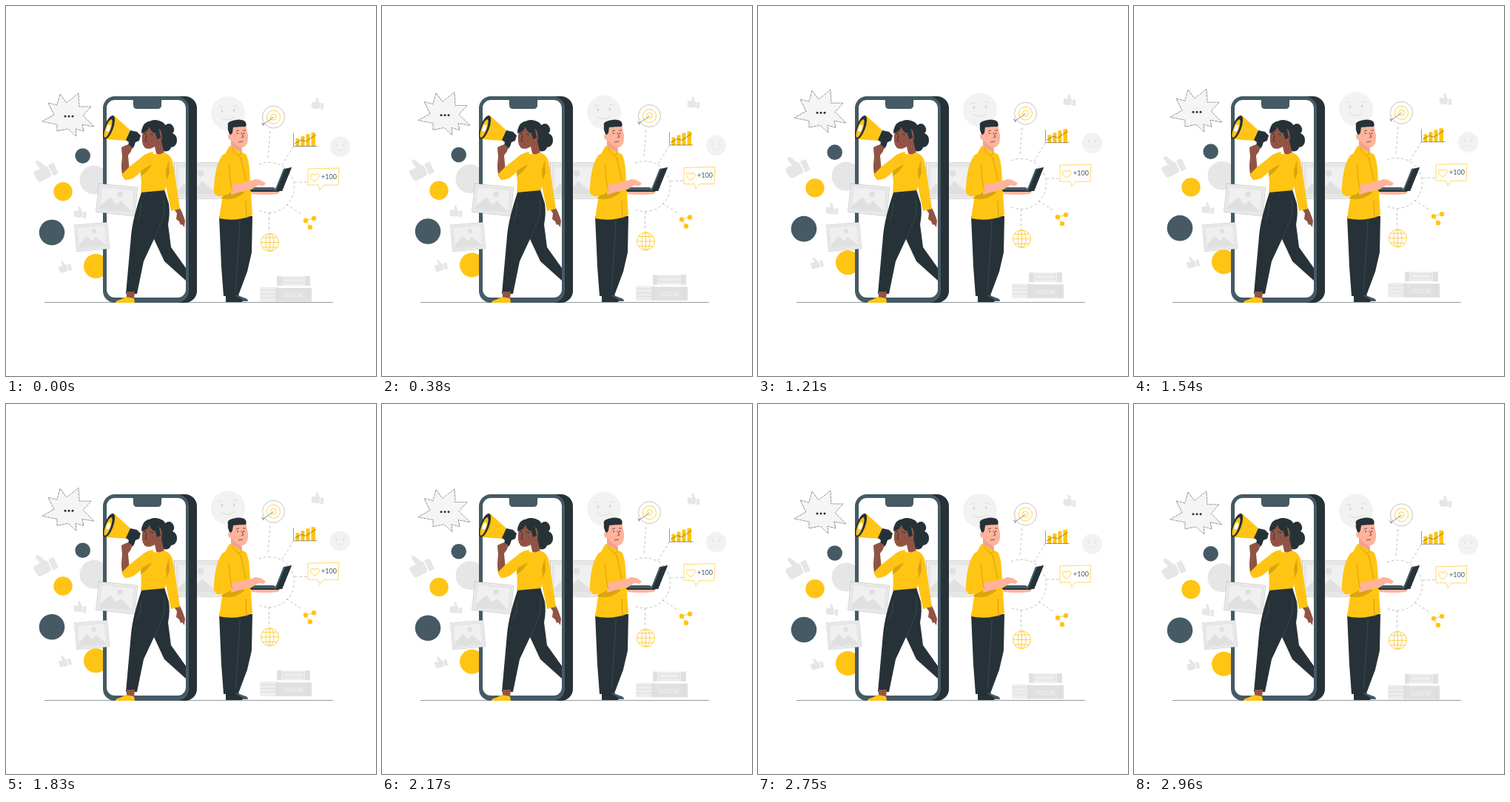
An HTML page that plays this animation: 500 px wide and 500 px high, repeating every 3 s.

```html
<!DOCTYPE html>
<html lang="en">
<head>
<meta charset="utf-8">
<title>Mobile marketing</title>
<style>
html, body { margin: 0; width: 100%; height: 100%; overflow: hidden; background: #fff; }
svg { display: block; width: 100vw; height: 100vh; }
.y { fill: #ffc414; }
.s { fill: #455a64; }
.d { fill: #263238; }
.brown { fill: #915444; }
.peach { fill: #ffb39c; }
.line { fill: none; stroke: #263238; stroke-width: .5; }
.gold { fill: none; stroke: #ffc414; stroke-width: .8; }
.dash { fill: none; stroke: #a6a6a6; stroke-width: .7; stroke-dasharray: 3.5 3; }
.frame { fill: #fff; stroke: #666; stroke-width: .5; stroke-dasharray: 1.5 .8; }
text { font-family: Lato, Inter, sans-serif; }
</style>
</head>
<body>
<svg viewBox="0 0 500 500">
<defs>
  <g id="thumb">
    <path d="M-15 0q0-3 3-3h8l-2-8q-.5-4 2.500-4 2 0 3 3l4 8 3 3v12q-3 2-6 2h-11q-3 0-3-2.500l-1-3z"/>
    <path d="M8-3h8v16h-8z"/>
  </g>
  <g id="smile">
    <circle r="23" fill="#f2f2f2"/>
    <path d="M-9 6q8 7 18-1M-13-8q3-3 6-1M7-10q3-2 6 1" fill="none" stroke="#dcdcdc" stroke-linecap="round"/>
    <g fill="#d6d6d6"><ellipse cx="-8" cy="-3" rx="1.300" ry="2"/><ellipse cx="8" cy="-4" rx="1.300" ry="2"/></g>
  </g>
  <g id="photo">
    <path class="frame" d="M-1-1h54v41h-54z"/>
    <path fill="#e6e6e6" d="M0 0h52v39h-52z"/>
    <path fill="#f0f0f0" d="M4 4h44v31h-44z"/>
    <path fill="#e0e0e0" d="M4 35v-5l13-13 9 9 6-6 16 14v1z"/>
    <circle cx="30" cy="11" r="4" fill="#e0e0e0"/>
  </g>
</defs>

<g class="float">
  <g fill="#e6e6e6">
    <use href="#thumb" transform="translate(51 221) rotate(-25)"/>
    <use href="#thumb" transform="translate(100 279) rotate(8) scale(.54)"/>
    <use href="#thumb" transform="translate(79 352) rotate(-15) scale(.55)"/>
    <use href="#thumb" transform="translate(421 132) rotate(8) scale(.54)"/>
  </g>

  <path fill="#f5f5f5" d="M58 133l12 2 4-15 9 13 15-14v18l14 1-9 10 14 13-14-1 3 9-12-4 1 9-11-9-14 4-1-10-17-4 13-8z"/>
  <path class="line" stroke-dasharray="4 .7" d="M57 131l12 3 4-15 9 12 16-13 1 18 16 0-11 12 15 15-16-3 2 9-11-3 1 10-11-10-15 3 0-9-20-4 16-9z"/>
  <g class="d"><circle cx="80" cy="149" r="1.500"/><circle cx="85" cy="149" r="1.500"/><circle cx="90" cy="149" r="1.500"/></g>

  <circle class="s" cx="103.700" cy="202.500" r="10.300"/>
  <circle cx="119" cy="235" r="19.500" fill="#e6e6e6"/>
  <circle class="y" cx="77" cy="250.700" r="12.700"/>
  <circle class="s" cx="62" cy="306" r="17.300"/>
  <circle class="y" cx="121.500" cy="351.500" r="16.500"/>

  <use href="#smile" transform="translate(300 145)"/>
  <use href="#smile" transform="translate(451.500 190) scale(.6)"/>

  <path class="dash" d="M342 214A34 34 0 1 1 342 276.500M354 205L357 167M373 215L388 190M390 238h18M379 268l21 14M355.500 279v27"/>

  <circle cx="361.500" cy="150" r="15" fill="#fff" stroke="#888" stroke-width=".5"/>
  <circle class="gold" cx="361.500" cy="150" r="9"/>
  <circle class="gold" cx="361.500" cy="150" r="4"/>
  <path class="line" d="M346 161L362 150M345 158l3 1v3"/>

  <path class="y" d="M391.500 179h5v10.500h-5zM398.500 176h5v13.500h-5zM405.500 173h5v16.500h-5zM412.500 171h5.500v18.500h-5.500z"/>
  <path class="line" d="M388.500 172v17.500h32M390 186l9-5 6 2 14-9"/>

  <path class="gold" stroke-dasharray="3 .7" d="M408 220l42-1-1 23h-20l-5 7-2-7h-14z"/>
  <path class="gold" d="M417 237c-8-5-6-10-3-10q2 0 3 2 1-2 3-2c4 0 5 5-3 10z"/>
  <text class="s" x="426" y="234" font-size="9">+100</text>

  <path class="gold" d="M416 287l-11 3 6 9"/>
  <g class="y"><circle cx="416" cy="287" r="3.200"/><circle cx="405" cy="290" r="3.200"/><circle cx="411" cy="299" r="3.200"/></g>

  <g class="gold">
    <circle cx="356.500" cy="319.500" r="12"/>
    <ellipse cx="356.500" cy="319.500" rx="5.500" ry="12"/>
    <path d="M356.500 307.500v24M344.500 319.500h24M347 313h19M347 326h19"/>
  </g>

  <path fill="#ededed" d="M343 380h26v19.500h-26zM366 365h45v13h-45z"/>
  <path fill="#e0e0e0" d="M364 381h49v18.500h-49zM366 365h6v13h-6zM404 365h7v13h-7z"/>
  <path stroke="#d6d6d6" stroke-width=".7" fill="none" d="M344 384h20M344 389h20M344 394h20M367 381v18M409 381v18M374 368h28v6h-28z"/>
  <text x="374" y="394" font-size="8" font-weight="700" fill="#f0f0f0">COLOR</text>
</g>

<path class="line" d="M52 400.500h390"/>

<!-- Phone: one photo sits between the screen and the rim -->
<rect x="135" y="126" width="110" height="270" rx="12" fill="#fff"/>
<use href="#photo" transform="translate(228.500 213) scale(1.150 1.180)"/>
<path class="d" d="M228 122h14a16 16 0 0 1 16 16v247a16 16 0 0 1-16 16h-14q15-1 15-16v-247q0-15-15-16z"/>
<path class="s" fill-rule="evenodd" d="M147 122h84a16 16 0 0 1 16 16v247a16 16 0 0 1-16 16h-84a16 16 0 0 1-16-16v-247a16 16 0 0 1 16-16zM147 127a11 11 0 0 0-11 11v245a11 11 0 0 0 11 11h85a11 11 0 0 0 11-11v-245a11 11 0 0 0-11-11z"/>
<path class="s" d="M170 126q2 0 2 4v4q0 5 5 5h28q5 0 5-5v-4q0-4 2-4z"/>

<use href="#photo" transform="translate(126.500 241) rotate(6) scale(.97 .94)"/>
<use href="#photo" transform="translate(93.500 297) rotate(-5) scale(.82 .87)"/>

<!-- Woman -->
<g>
  <path class="d" d="M190 159q7-7 17-4 7 2 8 6 7-5 11 2 3 6-1 9 7 3 6 11-1 7-8 8-2 7-10 5-8 1-9-7l-13-20z"/>
  <path class="brown" d="M187 164q-4 9-3 19 1 10 9 10 4 0 8-3l2 9q5 7 11 0l-4-16q2-8-1-15l-12-9z"/>
  <path class="d" d="M183 172q0-12 9-16 9-1 14 7l3 15-5 2-2-8q-7-2-8-9-3 8-11 9z"/>
  <path stroke="#263238" stroke-width=".9" fill="none" d="M186 173l4-1M195 173l4 1M190 175l-2 7 3 1"/>
  <path stroke="#b33f39" stroke-width="1.300" d="M190 187l5 0"/>

  <path class="brown" d="M225 272l9-1 4 8 4 11-1 9-3-4-2 1-2-5-4-3 1-8z"/>
  <path class="y" d="M214 199q10 2 12 15l9 60-12 3-9-44z"/>
  <path class="d" d="M183 249l31-1 6 19q2 14-1 28l4 31 20 28v17l-29-26-14-30-14 30-9 44h-15l7-78q2-24 15-62z"/>
  <path d="M183 266q-1 16-6 25M213 262q4 15-3 30l-10 23" fill="none" stroke="#46545a" stroke-width=".6"/>
  <path class="y" d="M195 198q10 5 18 0l7 3q5 14 0 26l-5 22-33 3q2-14-1-30z"/>
  <path class="brown" d="M156 192q4-5 10-3l3 7-4 6 2 22-7 9q-6-7-3-29z"/>
  <path class="y" d="M199 197q-10 1-18 9l-14 11-11 11 5 7q11 1 23-13l12-8z"/>
  <path fill="#d9a40c" d="M183 222l14-8q-5 10-15 16zM216 222l4-14 1 18-4 9z"/>
  <path class="brown" d="M163 386h11l-1 10h-10z"/>
  <path class="y" d="M162 393l11 2 1 6h-26q0-3 6-4z"/>

  <path class="y" d="M146 148l22 20-4 14-30-2q-6-15 12-32z"/>
  <path class="d" d="M168 168l9 2 5 5-2 7-5 2-2 6q-4 6-9 3l2-9-4-3z"/>
  <ellipse class="d" cx="139" cy="164" rx="6" ry="17" transform="rotate(20 139 164)"/>
  <ellipse class="y" cx="138" cy="165.500" rx="3.500" ry="13" transform="rotate(20 138 165.500)"/>
  <ellipse cx="138.500" cy="165" rx="2.500" ry="5" transform="rotate(20 138.500 165)" fill="#fff"/>
  <path class="brown" d="M156 191l9-4 6 4-3 7-9 2z"/>
</g>

<!-- Man -->
<g>
  <path class="s" d="M299 391l13-2 4 3 5 2q6 1 6 5h-29z"/>
  <path class="d" d="M297 391h12l11 6-1 3h-22z"/>
  <path class="d" d="M288 284h45l-1 49-6 26-9 24-3 8-20 1-3-40z"/>
  <path d="M316 290l-2 37-4 58" fill="none" stroke="#46545a" stroke-width=".7"/>
  <path fill="#f0a28c" d="M304 178l14 6 1 14-15-6z"/>
  <path class="peach" d="M304 164q11-6 20-3l3 13q1 15-7 17-9 0-14-9-6-1-6-6 1-5 4-3z"/>
  <path class="d" d="M302 173q-3-6-2-11-2-5 6-7 9-3 16 0 4 3 2 8-9 0-17 1l-1 7-2 3z"/>
  <path d="M311 169l4-1M320 168l4 0M318 171l3 6-3 1M314 184l6-1" stroke="#263238" stroke-width=".7" fill="none"/>
  <path d="M313 171.500v1.500M321.500 171.500v1.500" stroke="#263238" stroke-width="1.300"/>

  <path class="y" d="M302 189l17 9 5 2q4 7 5 21l4 62q-22 9-45 4l5-33-9-4q2-38 13-52z"/>
  <path d="M305 193l10 10 3-5M317 204l7 32M324 263l1 24" fill="none" stroke="#c7950c" stroke-width=".8"/>
  <path fill="#d9a40c" d="M290 260q19 4 32-8l-10-11-7 5z"/>

  <path class="peach" d="M331 250l30-1 7-8 6-1 2 5-9 9q-17 2-35 0z"/>
  <path class="d" d="M330 248h38l1 3h-38z"/>
  <path class="s" d="M363 250l12-30 11-2-13 32z"/>
  <path class="d" d="M365 250l12-29 9-3-13 32z"/>
  <path class="s" d="M334 245h28l4 4h-35z"/>
  <path class="peach" d="M304 242l25-5 8-3q8 0 14 6l-3 3-7-1-6 4-31 9z"/>
  <path class="y" d="M293 201q6-3 9 5l2 30 2 14q-9 8-20 7-7-3-5-13 2-31 12-43z"/>
  <path d="M301 215l3 28 2 7" fill="none" stroke="#c7950c" stroke-width=".7"/>
</g>
</svg>
<script>
const LOOP = 3000, RISE = 6;
const layer = document.querySelector('.float');
const start = performance.now();

// Steady rise for half the loop, then a steady fall.
function tick() {
  const phase = (performance.now() - start) % LOOP / LOOP;
  const lift = RISE * (1 - Math.abs(1 - 2 * phase));
  layer.setAttribute('transform', `translate(0 ${-lift.toFixed(2)})`);
  requestAnimationFrame(tick);
}
tick();
</script>
</body>
</html>
```
